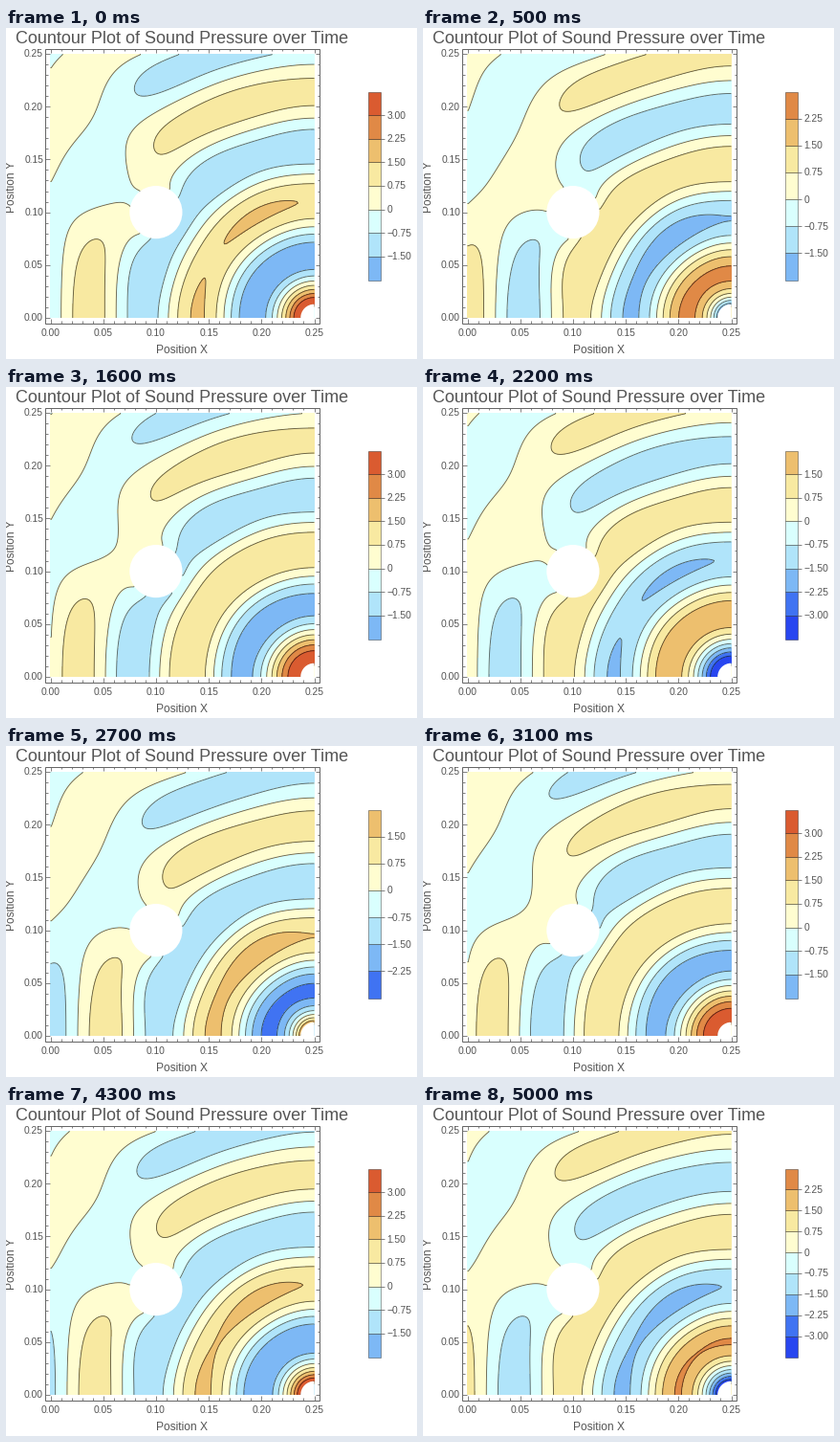
A matplotlib script for the animation above (5100 ms loop, 430 by 346 pixels).

```python
import math
import numpy as np
import matplotlib.pyplot as plt
from matplotlib.animation import FuncAnimation
from matplotlib.patches import Circle, Rectangle, Wedge

W, H, DPI = 430, 346, 100
FRAMES, INTERVAL = 51, 100

# Acoustic model: hard bottom and right walls, absorbing left, top and obstacle
SIZE, CELLS = 0.25, 160
STEP = SIZE / CELLS
WAVENUMBER = 61.0
OBSTACLE = (0.1, 0.1, 0.025)
SPEAKER = (0.25, 0.0, 0.0125)
GAIN, PHASE, TURN = 6.6, 0.967, 0.137 * math.pi

# Stage geometry in pixels
LEFT, BOTTOM, SCALE = 46.5, 303.0, 1104.0
PAD = 5.5
BAR_X, BAR_W, BAR_TOP, BAR_BOTTOM = 378.5, 13.5, 66.5, 263.5

LEVELS = np.arange(-4, 5) * 0.75
COLORS = ["#2846f0", "#4073f2", "#7db8f5", "#b0e4fa", "#d9fffe",
          "#fffdd0", "#f8e9a1", "#edbf6e", "#e08946", "#da5b30"]
GRAY, INK = "#666666", "#555555"
LINE = (0, 0, 0, 0.6)


def pt(px):
    return px * 72 / DPI


def to_px(x, y):
    return LEFT + x * SCALE, BOTTOM - y * SCALE


def distance(x, y, circle):
    cx, cy, r = circle
    return np.hypot(x - cx, y - cy) - r


def clearance(x, y):
    """Signed distance to the nearest solid circle."""
    return np.minimum(distance(x, y, OBSTACLE), distance(x, y, SPEAKER))


def open_part(x, y):
    return np.clip(clearance(x, y) / STEP + 0.5, 0, 1)


def solve_field():
    """Complex pressure on the cell centres, solved row by row."""
    c = (np.arange(CELLS) + 0.5) * STEP
    x, y = np.meshgrid(c, c)
    half = STEP / 2
    east, west = open_part(x + half, y), open_part(x - half, y)
    north, south = open_part(x, y + half), open_part(x, y - half)
    across, up = east[:, :-1], north[:-1]

    faces = np.zeros((CELLS, CELLS))
    faces[:, :-1] += across
    faces[:, 1:] += across
    faces[:-1] += up
    faces[1:] += up
    kh = WAVENUMBER * STEP
    diag = kh ** 2 * open_part(x, y) - faces + 0j
    leak = 1j * kh / (1 - 0.5j * kh)
    diag[:, 0] += leak
    diag[-1] += leak
    rim = np.hypot(east - west, north - south)
    near = distance(x, y, OBSTACLE) < 3 * STEP
    diag += 1j * kh * rim * near
    diag[faces == 0] = 1

    ring = np.exp(-(distance(x, y, SPEAKER) / STEP) ** 2) * open_part(x, y)
    rhs = -ring / ring.sum() + 0j

    inverses = []
    for j in range(CELLS):
        m = np.diag(diag[j]) + np.diag(across[j], 1) + np.diag(across[j], -1)
        if j:
            link = up[j - 1]
            m -= link[:, None] * inverses[-1] * link
            rhs[j] -= link * (inverses[-1] @ rhs[j - 1])
        inverses.append(np.linalg.inv(m))
    p = np.zeros((CELLS, CELLS), complex)
    p[-1] = inverses[-1] @ rhs[-1]
    for j in range(CELLS - 2, -1, -1):
        p[j] = inverses[j] @ (rhs[j] - up[j] * p[j + 1])
    return p, clearance(x, y) > 0


def extend_into_solids(p, known, layers=5):
    """Continue the field a little way under the white discs."""
    p, known = np.where(known, p, 0), known.copy()
    moves = [(1, 0), (-1, 0), (1, 1), (-1, 1)]
    for _ in range(layers):
        total = sum(np.roll(p, s, a) for s, a in moves)
        count = sum(np.roll(known, s, a).astype(int) for s, a in moves)
        fresh = ~known & (count > 0)
        p[fresh] = total[fresh] / count[fresh]
        known |= fresh
    return p


raw, fluid = solve_field()
field = np.pad(extend_into_solids(raw, fluid), 1, mode="edge") * GAIN
fluid = np.pad(fluid, 1, mode="edge")
nodes = np.concatenate([[0], (np.arange(CELLS) + 0.5) * STEP, [SIZE]])
grid_x, grid_y = to_px(*np.meshgrid(nodes, nodes))

plt.rcParams["font.family"] = "Liberation Sans"
fig = plt.figure(figsize=(W / DPI, H / DPI), dpi=DPI, facecolor="white")
ax = fig.add_axes([0, 0, 1, 1])
ax.set_xlim(0, W)
ax.set_ylim(H, 0)
ax.axis("off")


def label(x, y, text, size, **kw):
    return ax.text(x, y, text, fontsize=pt(size), color=INK, **kw)


def stroke(xs, ys, color=GRAY, width=0.8):
    return ax.plot(xs, ys, color=color, lw=pt(width),
                   solid_capstyle="butt", zorder=5)[0]


def draw_frame():
    x0, y0 = LEFT - PAD, BOTTOM + PAD
    x1, y1 = LEFT + SIZE * SCALE + PAD, BOTTOM - SIZE * SCALE - PAD
    ax.add_patch(Rectangle((x0, y1), x1 - x0, y0 - y1, fill=False,
                           ec=GRAY, lw=pt(1), zorder=5))
    for i in range(26):
        x, y = to_px(i / 100, i / 100)
        n = 2.5 if i % 5 else 4.5
        for edge, d in ((y0, -n), (y1, n)):
            stroke([x, x], [edge, edge + d])
        for edge, d in ((x0, n), (x1, -n)):
            stroke([edge, edge + d], [y, y])
        if i % 5 == 0:
            text = f"{i / 100:.2f}"
            label(x, 321.5, text, 10.3, ha="center", va="baseline")
            label(39, y + 3.5, text, 10.3, ha="right", va="baseline")


def draw_static():
    cx, cy, r = OBSTACLE
    ax.add_patch(Circle(to_px(cx, cy), r * SCALE, fc="white", lw=0, zorder=4))
    cx, cy, r = SPEAKER
    ax.add_patch(Wedge(to_px(cx, cy), r * SCALE + 0.5, 180, 270,
                       fc="white", lw=0, zorder=4))
    draw_frame()
    label(184, 16, "Countour Plot of Sound Pressure over Time", 18,
          ha="center", va="baseline")
    label(184, 340, "Position X", 12, ha="center", va="baseline")
    label(6.5, 166, "Position Y", 12, ha="center", va="center", rotation=90)


def draw_legend(low, high):
    """Colour bar holding only the bands present between low and high."""
    inside = [i for i, v in enumerate(LEVELS) if low < v < high]
    bands = range(inside[0], inside[-1] + 2)
    h = (BAR_BOTTOM - BAR_TOP) / len(bands)
    parts = []
    for n, band in enumerate(bands):
        y = BAR_BOTTOM - (n + 1) * h
        parts.append(ax.add_patch(Rectangle(
            (BAR_X, y), BAR_W, h, fc=COLORS[band], ec=LINE, lw=pt(0.6))))
        if n < len(inside):
            value = LEVELS[band]
            text = f"{value:.2f}".replace("-", "\u2212") if value else "0"
            end = BAR_X + BAR_W
            parts.append(stroke([end, end + 4], [y, y]))
            parts.append(label(398.5, y + 3.5, text, 10.3, va="baseline"))
    return parts


live = []


def update(n):
    while live:
        live.pop().remove()
    p = (field * np.exp(-1j * (PHASE + TURN * n))).real
    live.append(ax.contourf(grid_x, grid_y, p, LEVELS, colors=COLORS,
                            extend="both", zorder=1))
    live.append(ax.contour(grid_x, grid_y, p, LEVELS, colors=[LINE],
                           linewidths=pt(0.9), linestyles="solid", zorder=2))
    live.extend(draw_legend(p[fluid].min(), p[fluid].max()))
    return live


draw_static()
anim = FuncAnimation(fig, update, frames=FRAMES, interval=INTERVAL,
                     repeat=True, repeat_delay=0, blit=False)
plt.show()
```
